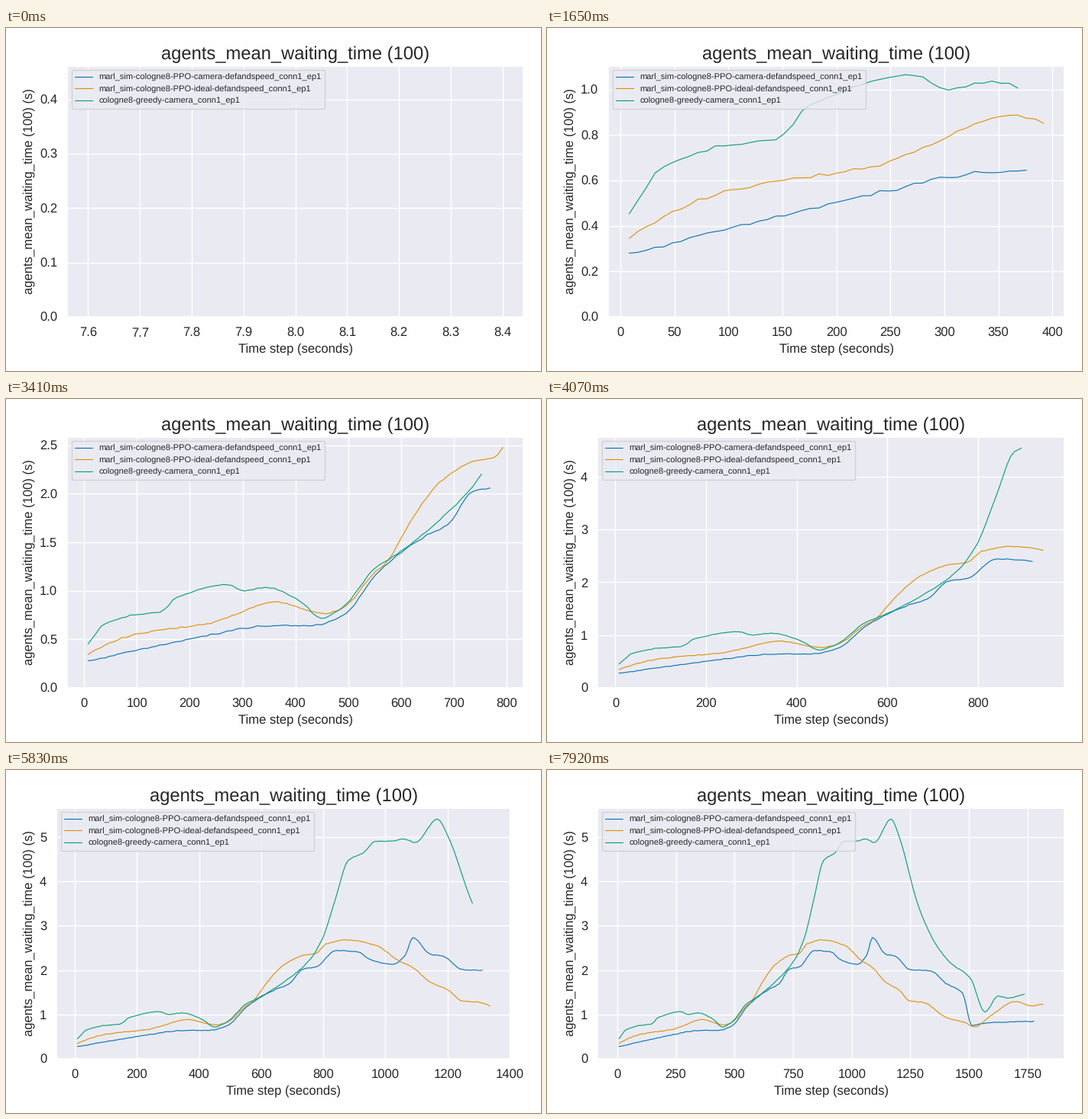
Write a matplotlib script that moves like this. It is 700x450 px and loops after 8000 ms.

```python
import numpy as np
import matplotlib.pyplot as plt
from matplotlib.animation import FuncAnimation

W, H, DPI = 700, 450, 100
LOOP_MS, STEPS = 8000, 73
TOP, BOTTOM, RIGHT = 49.5, 379, 677
SAMPLE = 8  # seconds between two data points

plt.rcParams.update({
    "font.family": "Liberation Sans",
    "font.size": 12,
    "text.hinting": "none",
    "text.color": ".15",
    "axes.labelcolor": ".15",
    "axes.labelsize": 12,
    "axes.facecolor": "#EAEAF2",
    "axes.edgecolor": "white",
    "axes.linewidth": 1.25,
    "axes.axisbelow": True,
    "axes.grid": True,
    "grid.color": "white",
    "grid.linewidth": 1,
    "lines.solid_capstyle": "round",
    "lines.linewidth": 0.8,
    "xtick.bottom": False,
    "ytick.left": False,
    "xtick.major.size": 6,
    "ytick.major.size": 6,
    "xtick.color": ".15",
    "ytick.color": ".15",
    "xtick.labelsize": 12,
    "ytick.labelsize": 12,
})

# Key points of each curve: (sample number, waiting time)
CAMERA = [
    (1, .28), (14, .4), (32, .565), (43, .64), (55, .645), (62, .77),
    (69, 1.165), (80, 1.545), (86, 1.68), (92, 2.03), (97, 2.07),
    (105, 2.44), (114, 2.41), (119, 2.23), (128, 2.13), (133, 2.34),
    (136, 2.73), (143, 2.36), (148, 2.32), (156, 2.01), (167, 1.98),
    (175, 1.71), (184, 1.48), (189, .75), (197, .81), (222, .85),
]
IDEAL = [
    (1, .345), (5, .44), (12, .55), (30, .67), (36, .76), (45, .887),
    (57, .765), (62, .847), (68, 1.155), (72, 1.32), (77, 1.7), (84, 2.115),
    (92, 2.335), (97, 2.38), (101, 2.58), (109, 2.68), (121, 2.56),
    (130, 2.22), (136, 2.06), (143, 1.73), (150, 1.56), (156, 1.3),
    (163, 1.27), (176, .92), (185, .825), (190, .72), (200, 1.0),
    (212, 1.29), (221, 1.195), (227, 1.235),
]
GREEDY = [
    (1, .453), (5, .66), (12, .75), (18, .783), (22, .93), (34, 1.062),
    (38, 1.0), (43, 1.035), (51, .9), (56, .72), (61, .824), (69, 1.24),
    (73, 1.35), (83, 1.685), (95, 2.26), (100, 2.76), (105, 3.63),
    (110, 4.47), (116, 4.64), (121, 4.9), (128, 4.905), (132, 4.96),
    (137, 4.875), (146, 5.405), (150, 5.04), (161, 3.38), (171, 2.5),
    (178, 2.15), (188, 1.83), (196, 1.056), (203, 1.415), (208, 1.37),
    (217, 1.46),
]

# Label, colour, key points, samples per step, head start in samples
RUNS = [
    ("marl_sim-cologne8-PPO-camera-defandspeed_conn1_ep1", "#0173B2",
     CAMERA, 3.07, 0),
    ("marl_sim-cologne8-PPO-ideal-defandspeed_conn1_ep1", "#DE8F05",
     IDEAL, 3.113, 1.45),
    ("cologne8-greedy-camera_conn1_ep1", "#029E73",
     GREEDY, 3, 0),
]

rng = np.random.default_rng(8)


def series(keys):
    """Monotone cubic curve through the keys, slightly jittered."""
    kx, ky = np.array(keys).T
    width = np.diff(kx)
    slope = np.diff(ky) / width
    before, after = slope[:-1], slope[1:]
    same_sign = before * after > 0
    total = np.where(same_sign, before + after, 1)
    inner = np.where(same_sign, 2 * before * after / total, 0)
    tangent = np.concatenate([slope[:1], inner, slope[-1:]])

    samples = np.arange(1, kx[-1] + 1)
    i = np.clip(np.searchsorted(kx, samples, "right") - 1, 0, len(width) - 1)
    t, w = (samples - kx[i]) / width[i], width[i]
    y = (ky[i] * (1 + 2 * t) * (1 - t) ** 2
         + ky[i + 1] * t ** 2 * (3 - 2 * t)
         + w * t * (1 - t) * (tangent[i] * (1 - t) - tangent[i + 1] * t))
    jitter = rng.normal(0, .004, len(samples))
    jitter[0] = 0
    return samples * SAMPLE, y + jitter


def label_width(label):
    em = 12 * DPI / 72
    return em * sum(.278 if c == "." else .556 for c in label)


def visible_ticks(axis):
    lo, hi = axis.get_view_interval()
    ticks = [t for t in axis.get_majorticklocs() if lo <= t <= hi]
    return ticks, axis.get_major_formatter().format_ticks(ticks)


def place(left, right):
    ax.set_position([left / W, 1 - BOTTOM / H,
                     (right - left) / W, (BOTTOM - TOP) / H])


fig = plt.figure(figsize=(W / DPI, H / DPI), dpi=DPI, facecolor="white")
ax = fig.add_axes([.1, .1, .8, .8])
ax.set_title("agents_mean_waiting_time (100)", fontsize=17.1)
ax.set_xlabel("Time step (seconds)")
ax.set_ylabel("agents_mean_waiting_time (100) (s)")

data = [series(run[2]) for run in RUNS]
lines = [ax.plot([], [], color=color, label=name)[0]
         for name, color, *_ in RUNS]
ax.legend(loc="upper left", fontsize=8, framealpha=.8, edgecolor=".8")
lowest = min(y[0] for _, y in data)


def fit_axes():
    """Keep all tick labels inside the page margin."""
    place(80, RIGHT)
    left = 57.2 + max(map(label_width, visible_ticks(ax.yaxis)[1]))
    place(left, RIGHT)
    ticks, labels = visible_ticks(ax.xaxis)
    lo, hi = ax.get_xlim()
    inside = (hi - ticks[-1]) / (hi - lo) * (RIGHT - left)
    place(left, min(RIGHT, RIGHT + .5 - label_width(labels[-1]) / 2 + inside))


def update(step):
    last, peak = SAMPLE, 0
    for line, (x, y), (*_, rate, lead) in zip(lines, data, RUNS):
        n = min(len(x), 1 + round(rate * step + lead * min(step, 1)))
        line.set_data(x[:n], y[:n])
        last, peak = max(last, x[n - 1]), max(peak, y[:n].max())
    lo, hi = (SAMPLE, last) if last > SAMPLE else (.95 * SAMPLE, 1.05 * SAMPLE)
    margin = .05 * (hi - lo)
    ax.set_xlim(lo - margin, hi + margin)
    ax.set_ylim(0, peak + .05 * (peak - lowest))
    fit_axes()
    return lines


anim = FuncAnimation(fig, update, frames=STEPS, interval=LOOP_MS / STEPS,
                     init_func=lambda: update(0), repeat=True, repeat_delay=0)
plt.show()
```
